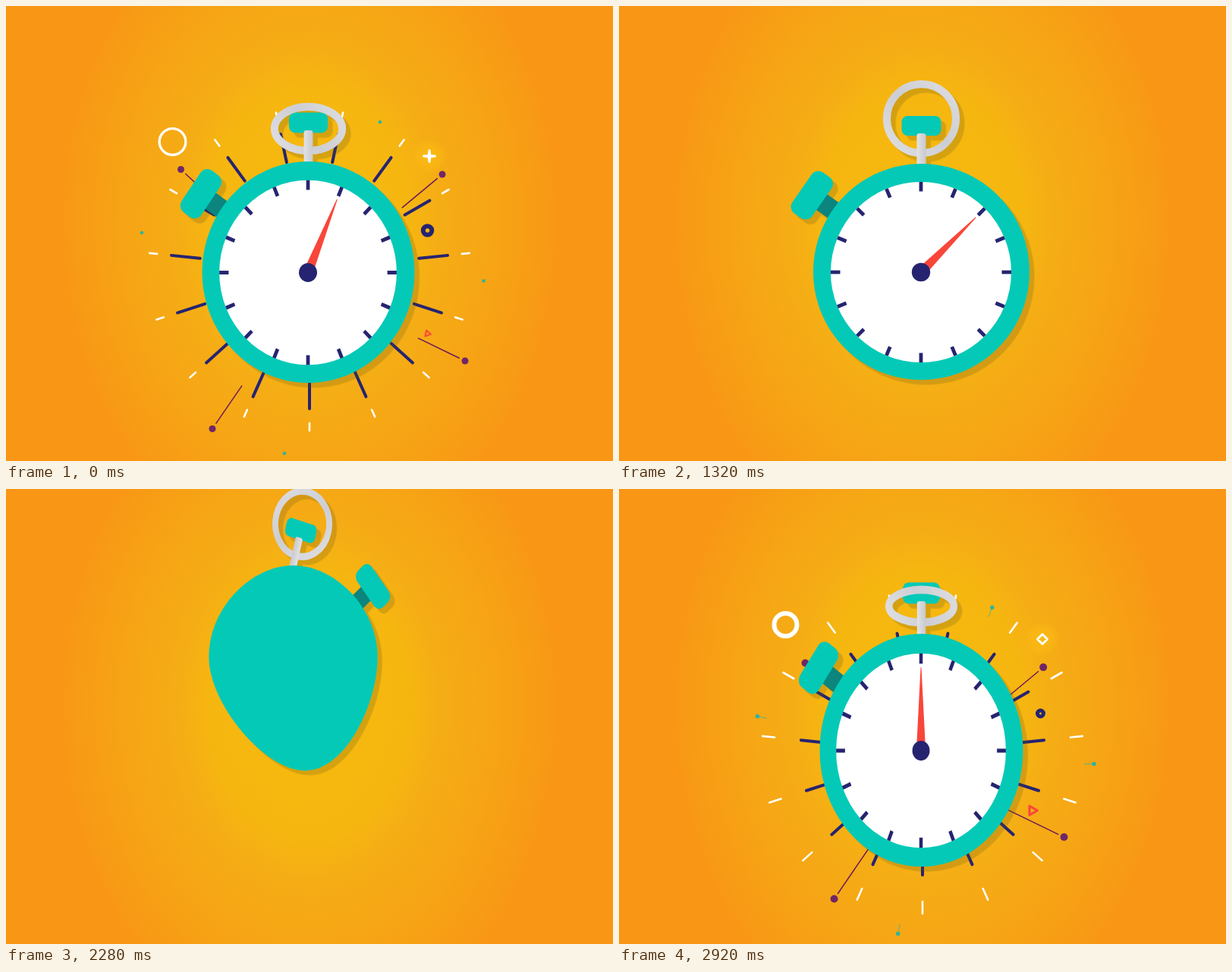
Write an HTML page with a canvas that moves like this. It is 800 by 600 pixels and loops after 2.96 s.

```html
<!DOCTYPE html>
<html>
<head>
<meta charset="utf-8">
<title>Stopwatch</title>
<style>
html, body { margin: 0; width: 100%; height: 100%; overflow: hidden; }
body { background: radial-gradient(330px 442px at 400px 285px, #f6bb0e, #f6b610 40%, #f5ad15 52%, #f6a615 70%, #f89915 96%, #f99615); }
canvas { display: block; }
</style>
</head>
<body>
<canvas id="stage" width="800" height="600"></canvas>
<script>
const LOOP = 2960, START = 1320, STEP = 40, TAU = Math.PI * 2, R = 142.5;
const TEAL = '#04c9b7', NAVY = '#262470', PURPLE = '#702766', RED = '#f9463a', WHITE = '#fff';
const main = document.getElementById('stage').getContext('2d');
const layer = document.createElement('canvas');
layer.width = 800;
layer.height = 600;
const art = layer.getContext('2d');

// Rows: time, centre y, x scale, y scale. Negative x scale shows the back.
const pose = [
  [1320, 350.5, 1, 1], [1640, 350, .979, .979], [1800, 347, .89, .89],
  [1960, 338.5, .65, .65], [2020, 337, .62, .62], [2080, 352, 1.3, .85],
  [2140, 345, .2, 1], [2200, 315, -1.3, 1], [2280, 236, -.78, .95],
  [2360, 226, -.1, 1.02], [2440, 244, .72, 1.06], [2560, 271, .835, 1.12],
  [2680, 335, .88, 1.1], [2760, 378, 1.12, .84], [2840, 352, 1.02, .99],
  [2920, 344.5, .94, 1.077], [2960, 351, .982, 1.024], [3040, 352, 1.01, .99],
  [3120, 350.5, 1, 1]
];
const ringTilt = [
  [1320, 1], [2200, 1], [2280, 1], [2440, .75], [2560, .81], [2680, .8], [2800, .2],
  [2920, .44], [2960, .62], [3080, 1], [3160, 1.015], [3320, .99], [3440, 1.01], [3560, 1]
];
const eggShape = [[2120, 0], [2200, .5], [2280, 1], [2360, .7], [2440, .3], [2560, .1], [2700, 0]];

// Smooth interpolation of column c through the rows of a track
function at(track, t, c) {
  const last = track.length - 1;
  if (t <= track[0][0]) return track[0][c];
  if (t >= track[last][0]) return track[last][c];
  const i = track.findIndex(k => k[0] > t) - 1;
  const slope = j => j < 1 || j >= last ? 0
    : (track[j + 1][c] - track[j - 1][c]) / (track[j + 1][0] - track[j - 1][0]);
  const [a, b] = [track[i], track[i + 1]], d = b[0] - a[0], u = (t - a[0]) / d, v = 1 - u;
  return a[c] * v * v * (1 + 2 * u) + b[c] * u * u * (1 + 2 * v)
    + d * u * v * (slope(i) * v - slope(i + 1) * u);
}

function handAngle(t) {
  const deg = t < 1920 ? 45 : t < 1960 ? 56 : t < 2200 ? 67.5
    : t < 2960 ? 0 : t < 3920 ? 22.5 : t < 3960 ? 34 : 45;
  return deg * TAU / 360;
}

function disc(g, x, y, r, color) {
  g.fillStyle = color;
  g.beginPath();
  g.arc(x, y, Math.max(0, r), 0, TAU);
  g.fill();
}

function hoop(g, x, y, outer, width, color) {
  if (outer <= 0 || width < .4) return;
  if (width >= outer) return disc(g, x, y, outer, color);
  g.strokeStyle = color;
  g.lineWidth = width;
  g.beginPath();
  g.arc(x, y, outer - width / 2, 0, TAU);
  g.stroke();
}

function line(g, x1, y1, x2, y2, width, color) {
  g.strokeStyle = color;
  g.lineWidth = width;
  g.beginPath();
  g.moveTo(x1, y1);
  g.lineTo(x2, y2);
  g.stroke();
}

function box(g, x, y, w, h, r, color) {
  g.fillStyle = color;
  g.beginPath();
  g.roundRect(x, y, w, h, r);
  g.fill();
}

function polygon(g, points, width, color) {
  g.strokeStyle = color;
  g.lineWidth = width;
  g.lineJoin = 'round';
  g.beginPath();
  points.forEach(([r, a]) => g.lineTo(r * Math.cos(a), r * Math.sin(a)));
  g.closePath();
  g.stroke();
}

function head(g, tilt, egg) {
  g.save();
  g.translate(0, -R);
  g.rotate(-egg * TAU / 24);
  g.translate(0, R);
  box(g, -26, -205.5, 52, 26, 8, TEAL);
  const ry = 45.5 * Math.abs(tilt), y = -156.5 - ry;
  const metal = g.createLinearGradient(-45, y + ry, 45, y - ry);
  metal.addColorStop(0, '#dedee2');
  metal.addColorStop(.5, '#cdced3');
  metal.addColorStop(1, '#dcdce0');
  g.strokeStyle = metal;
  g.lineWidth = 10;
  g.beginPath();
  g.ellipse(0, y, 45.5, ry, 0, 0, TAU);
  g.stroke();
  const stem = g.createLinearGradient(-6, 0, 6, 0);
  stem.addColorStop(0, '#e2e2e5');
  stem.addColorStop(1, '#c8c9ce');
  box(g, -6, -182.5, 12, 45, 3, stem);
  g.restore();
}

function sideButton(g, egg) {
  g.save();
  g.rotate((35 + 5 * egg) * TAU / 360);
  box(g, -168, -12.5, 32, 25, 0, '#0b857d');
  box(g, -192, -33, 32, 66, 11, TEAL);
  g.restore();
}

function body(g, egg) {
  const k = .5523, w = R * (k - .07 * egg), low = R * (k - .1 * egg);
  const y = -15 * egg, x = -20 * egg, up = (R + y) * k;
  g.fillStyle = TEAL;
  g.beginPath();
  g.moveTo(0, -R);
  g.bezierCurveTo(-w, -R, -R, y - up, -R, y);
  g.bezierCurveTo(-R, y + low, x - w, R, x, R);
  g.bezierCurveTo(x + w, R, R, y + low, R, y);
  g.bezierCurveTo(R, y - up, w, -R, 0, -R);
  g.fill();
}

function face(g, angle) {
  disc(g, -.5, .5, 119, WHITE);
  g.save();
  g.translate(-.5, .5);
  for (let i = 0; i < 16; i++) {
    line(g, 0, -119, 0, -106.5, 4.8, NAVY);
    g.rotate(TAU / 16);
  }
  g.rotate(angle);
  g.fillStyle = RED;
  g.beginPath();
  g.moveTo(-6.5, 0);
  g.lineTo(-.5, -102);
  g.lineTo(.5, -102);
  g.lineTo(6.5, 0);
  g.fill();
  disc(g, 0, 0, 12.2, NAVY);
  g.restore();
}

function drawWatch(t) {
  const sx = at(pose, t, 2), sy = at(pose, t, 3), egg = at(eggShape, t, 1);
  art.clearRect(0, 0, 800, 600);
  art.save();
  art.translate(398.5 - 20 * egg, at(pose, t, 1));
  art.scale(sx, sy);
  sideButton(art, egg);
  head(art, at(ringTilt, t, 1), egg);
  body(art, egg);
  if (sx > 0) face(art, handAngle(t));
  art.restore();

  main.save();
  main.shadowColor = 'rgba(90,80,25,.22)';
  main.shadowOffsetX = main.shadowOffsetY = 6.5 * Math.min(1, sy);
  main.drawImage(layer, 0, 0);
  main.restore();
}

// Travel that runs steadily, then eases out over the given rest
const travel = (b, speed, rest) => b < 1 ? speed * (b - 1) : rest * (1 - Math.exp(-.83 * (b - 1)));

function drawRays(g, b) {
  const from = 130 + 13 * Math.max(0, b);
  const to = b < 0 ? 163 + 23 * b : 208 - 45 * Math.max(0, 1 - b / 5) ** 3;
  const inner = 213 - 18 * .667 ** b, outer = Math.min(213, 233 + 16.5 * b);
  g.save();
  g.translate(400, 348);
  g.lineCap = 'round';
  for (let i = 0; i < 15; i++) {
    if (to > from) line(g, 0, from + 2, 0, to - 2, 4, NAVY);
    if (outer - inner > 1.5) line(g, 0, inner + 1, 0, outer - 1, 2.6, WHITE);
    g.rotate(TAU / 15);
  }
  g.restore();
}

function drawDots(g, b) {
  const far = travel(b, 20.5, 24), near = travel(b, 3.5, 2);
  const length = 69 * .75 ** (b - 1), r = Math.min(5, 5 - .5 * b);
  for (const [x, y, dx, dy] of [[230.5, 215.5, -.73, -.68], [575, 222, .77, -.64], [605, 468, .9, .436], [272, 557.5, -.565, .825]]) {
    const px = x + dx * far, py = y + dy * far;
    if (length > 8) line(g, px - dx * 8, py - dy * 8, px - dx * length, py - dy * length, 1.5, '#6b1a5a');
    disc(g, px, py, r, PURPLE);
  }
  if (b > 7) return;
  for (const [x, y, dx, dy] of [[493, 153, .35, -.94], [179, 299, -.97, -.2], [629.5, 362.5, 1, 0], [367, 590, -.2, .98]]) {
    const px = x + dx * near, py = y + dy * near;
    if (b < 1) line(g, px, py, px - dx * 13, py - dy * 13, 1, '#5db28a');
    disc(g, px, py, 2.7 - .4 * Math.max(0, b), '#2bb59f');
  }
}

function drawShapes(g, b) {
  hoop(g, 219.5, 179, 20 - 2 * .5 ** b, 6 * .55 ** b, WHITE);
  hoop(g, 555.5, 296, 11 - 4.5 * .5 ** b, b < 1 ? 5 + b : 6 * .6 ** (b - 1), NAVY);

  const size = 7 * Math.min(1, .65 ** b), go = travel(b, 1, 1);
  if (size > 1) {
    g.save();
    g.translate(555.5 + 11 * go, 432 + 8 * go);
    g.rotate(b * .2);
    polygon(g, [0, 1, 2].map(i => [size, i * TAU / 3]), Math.min(3, size * .45), RED);
    g.restore();
  }

  const glow = g.createRadialGradient(558, 198, 0, 558, 198, 25);
  const power = Math.min(1, Math.max(0, 1 - (b - 1) / 9), Math.max(0, (b + 3) / 3));
  glow.addColorStop(0, `rgba(255,200,20,${.55 * power})`);
  glow.addColorStop(.6, `rgba(255,190,20,${.4 * power})`);
  glow.addColorStop(1, 'rgba(255,185,20,0)');
  disc(g, 558, 198, 25, glow);

  const star = b < 1 ? 6.5 + b : 7.5 - 1.5 * (b - 1);
  if (star > .5) {
    const waist = Math.min(star * .707, Math.max(.6, 4.6 - 3.2 * Math.max(0, b)));
    g.save();
    g.translate(558, 198);
    polygon(g, [...Array(8).keys()].map(i => [i % 2 ? waist : star, i * TAU / 8]), Math.min(2.8, star * .5), WHITE);
    g.restore();
  }
}

function drawBurst(t) {
  const b = (t - 2920) / STEP;
  if (b < -3 || b > 15) return;
  drawRays(main, b);
  drawDots(main, b);
  drawShapes(main, b);
}

function frame(now) {
  const t = Math.floor(now % LOOP / STEP) * STEP;
  const time = t < START ? t + LOOP : t;
  main.clearRect(0, 0, 800, 600);
  drawBurst(time);
  drawWatch(time);
}

let begin;
function tick(now) {
  begin ??= now;
  frame(now - begin);
  requestAnimationFrame(tick);
}
frame(0);
requestAnimationFrame(tick);
</script>
</body>
</html>
```
